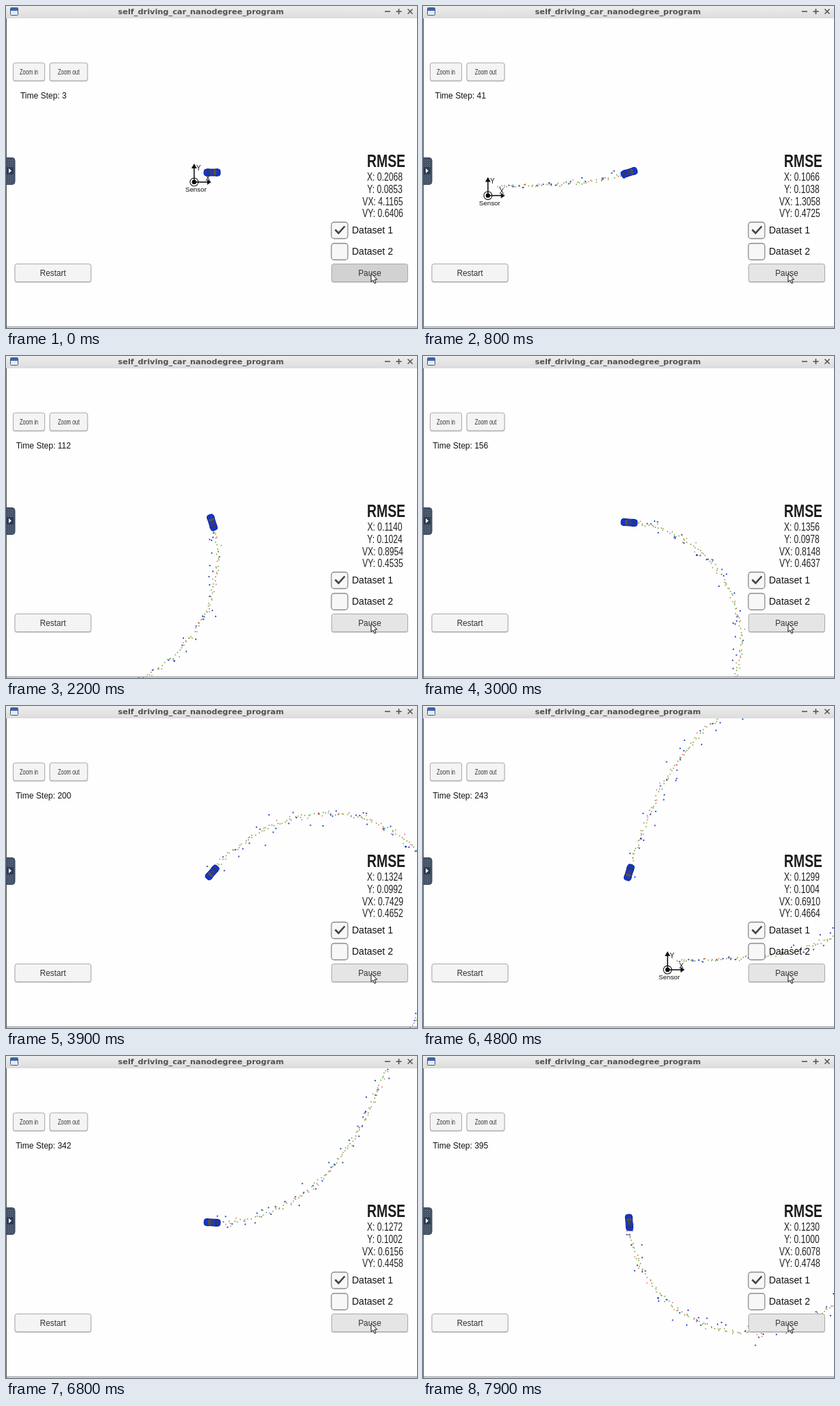
Recreate the animation shown at these times as an HTML page with a canvas. Size 600 px wide and 470 px high, loop 8 s.

```html
<!DOCTYPE html>
<html>
<head>
<meta charset="utf-8">
<style>
html, body { margin: 0; width: 100%; height: 100%; overflow: hidden; background: #fefefe }
canvas { display: block }
</style>
</head>
<body>
<canvas id="stage" width="600" height="470"></canvas>
<script>
const ctx = document.getElementById('stage').getContext('2d');
const SANS = '"Liberation Sans", Arial, sans-serif';
const CAR = { x: 301, y: 243 };
const LAST = 395, SPEED = 4.78;

// Time, step and the four error values at that moment.
const log = [
  [0, 3, .2068, .0853, 4.1165, .6406],
  [1500, 74, .0918, .1085, 1.0076, .4411],
  [3000, 156, .1356, .0978, .8148, .4637],
  [4800, 243, .1299, .1004, .6910, .4664],
  [5900, 295, .1245, .0972, .6418, .4369],
  [6800, 342, .1272, .1002, .6156, .4458],
  [7900, LAST, .1230, .1000, .6078, .4748]
];

// The car swings left through a figure eight with a period of 500 steps.
const heading = s => 2.213 * (1 - Math.cos((s + .6) * Math.PI / 250));

// Positions relative to the sensor, one per time step.
const path = [[12, -14]];
for (let s = 1; s <= LAST; s++) {
  const [x, y] = path[s - 1], angle = heading(s - .5);
  path.push([x + SPEED * Math.cos(angle), y - SPEED * Math.sin(angle)]);
}

function random(n) {
  const v = Math.sin(n * 127.1 + 3.7) * 43758.5453;
  return v - Math.floor(v);
}
const noise = n => 2 * (random(n) + random(n + .31) + random(n + .67) - 1.5);

// Lidar (red) and radar (blue) readings alternate; estimates are green.
const marks = path.map(([x, y], s) => {
  const list = [[x + noise(s + 1000) * 1.4, y + noise(s + 2000) * 1.4, '#62a52c', 1.7]];
  if (s % 2) list.push([x + noise(s + 3000) * 2.7, y + noise(s + 4000) * 2.7, '#e8584a', 1.6]);
  else {
    const r = Math.hypot(x, y) + noise(s + 5000) * 6;
    const angle = Math.atan2(y, x) + noise(s + 6000) * .03;
    list.push([r * Math.cos(angle), r * Math.sin(angle), '#1830c0', 2]);
  }
  return list;
});

function text(str, x, y, size, { color = '#111', align = 'center', squeeze = 1, weight = '', font = SANS } = {}) {
  ctx.save();
  ctx.translate(x, y);
  ctx.scale(squeeze, 1);
  ctx.font = `${weight} ${size}px ${font}`;
  ctx.textAlign = align;
  ctx.fillStyle = color;
  ctx.fillText(str, 0, 0);
  ctx.restore();
}

function rect(x, y, w, h, color) {
  ctx.fillStyle = color;
  ctx.fillRect(x, y, w, h);
}

function box(x, y, w, h, r, fill, stroke, width = 1) {
  ctx.beginPath();
  ctx.roundRect(x, y, w, h, r);
  ctx.fillStyle = fill;
  ctx.fill();
  if (!stroke) return;
  ctx.strokeStyle = stroke;
  ctx.lineWidth = width;
  ctx.stroke();
}

function line(points, color, width) {
  ctx.beginPath();
  points.forEach(p => ctx.lineTo(...p));
  ctx.strokeStyle = color;
  ctx.lineWidth = width;
  ctx.stroke();
}

function shape(points, color) {
  ctx.beginPath();
  points.forEach(p => ctx.lineTo(...p));
  ctx.closePath();
  ctx.fillStyle = color;
  ctx.fill();
}

function disc(r, color) {
  ctx.beginPath();
  ctx.arc(0, 0, r, 0, 7);
  ctx.fillStyle = color;
  ctx.fill();
}

function drawSensor(x, y) {
  ctx.save();
  ctx.translate(x, y);
  disc(6.5, '#111');
  disc(5.4, '#fff');
  disc(3.2, '#000');
  line([[0, 0], [0, -22]], '#111', 1.6);
  line([[0, 0], [21, 0]], '#111', 1.6);
  shape([[-4, -20], [0, -27], [4, -20]], '#111');
  shape([[19, -4], [25, 0], [19, 4]], '#111');
  text('Y', 6.5, -17.5, 10);
  text('X', 20, -2.5, 10);
  text('Sensor', 2.5, 14, 9.8);
  ctx.restore();
}

function drawCar(angle) {
  ctx.save();
  ctx.translate(CAR.x, CAR.y);
  ctx.rotate(-angle);
  for (const x of [-8, 5]) rect(x, -5.5, 4, 11, '#101a50');
  box(-12, -5, 24, 10, 3.5, '#1234d4', '#0c1e88', .8);
  box(-8, -3.5, 3, 7, 1, '#34385a');
  box(2, -4, 4, 8, 1.5, '#57503c');
  box(-3, -3, 4, 6, 1, '#3a4068');
  ctx.restore();
}

function button(label, x, y, w, h, fill, size, squeeze) {
  box(x, y + 1, w, h, 3, '#d0d0d0');
  box(x + .5, y + .5, w - 1, h - 1, 3, fill, '#a9a9a9');
  text(label, x + w / 2, y + h / 2 + size * .35, size, { color: '#333', squeeze });
}

function drawWindow() {
  const bar = ctx.createLinearGradient(0, 0, 0, 18);
  bar.addColorStop(0, '#ededed');
  bar.addColorStop(1, '#dcdcdc');
  rect(0, 0, 600, 18, bar);
  text('self_driving_car_nanodegree_program', 284.5, 12, 11.33,
    { color: '#505050', weight: 'bold', font: '"DejaVu Sans", sans-serif' });
  box(6.5, 2.5, 11, 11, 1, '#e4ebf4', '#46587a');
  rect(7, 3, 10, 4, '#3a66ac');
  line([[553, 8], [561, 8]], '#555', 1.6);
  line([[569.5, 8], [577.5, 8]], '#555', 1.6);
  line([[573.5, 4], [573.5, 12]], '#555', 1.6);
  line([[586.5, 4.5], [593.5, 11.5]], '#555', 1.6);
  line([[593.5, 4.5], [586.5, 11.5]], '#555', 1.6);
  rect(0, 18, 1, 452, '#555');
  rect(0, 468, 600, 1, '#777');

  box(-4, 221.5, 17, 39, 4, '#46546a', '#38445a');
  for (let y = 225; y < 259; y += 3)
    for (let x = 3; x < 11; x += 3) rect(x, y, 1, 1, '#6c7a90');
  box(1, 235, 10, 11, 1, '#2e3a50');
  shape([[4, 237], [8, 240.5], [4, 244]], '#fff');
}

function drawPanel(values, step, pressed) {
  button('Zoom in', 10, 82.5, 47, 27, '#f4f4f4', 11.5, .65);
  button('Zoom out', 63.5, 82.5, 56, 27, '#f4f4f4', 11.5, .65);
  button('Restart', 12.5, 376, 112, 27, '#f4f4f4', 13, .91);
  button('Pause', 475, 376, 112, 27, pressed ? '#d2d2d2' : '#e5e5e5', 13, .91);
  text('Time Step: ' + step, 54.7, 135, 12);

  text('RMSE', 555, 235, 25.5, { color: '#1c1c1c', weight: 'bold', squeeze: .76 });
  ['X', 'Y', 'VX', 'VY'].forEach((name, i) =>
    text(`${name}: ${values[i].toFixed(4)}`, i < 2 ? 553 : 550, 255 + i * 17.8, 16,
      { color: '#222', squeeze: .76 }));

  [315.5, 346.5].forEach((y, i) => {
    box(475, y, 24, 24, 4, '#f7f7f7', '#8a8a8a', 1.3);
    text('Dataset ' + (i + 1), 505, y + 16.5, 14, { align: 'left' });
  });
  line([[480.5, 326.5], [485.5, 331.5], [494.5, 321.5]], '#444', 2.6);
}

function drawCursor() {
  ctx.save();
  ctx.translate(533, 390.5);
  const arrow = [[0, 0], [0, 12], [2.8, 9.5], [5, 14.5], [7, 13.5], [5, 8.8], [8.8, 8.6]];
  shape(arrow, '#fff');
  line([...arrow, arrow[0]], '#111', 1);
  ctx.restore();
}

function draw(time) {
  let i = 0;
  while (i < log.length - 2 && time >= log[i + 1][0]) i++;
  const a = log[i], b = log[i + 1];
  const step = Math.round(a[1] + (b[1] - a[1]) * (time - a[0]) / (b[0] - a[0]));
  const u = Math.log(step / a[1]) / Math.log(b[1] / a[1]);
  const values = [2, 3, 4, 5].map(k => a[k] * (b[k] / a[k]) ** u);
  const ox = CAR.x - path[step][0], oy = CAR.y - path[step][1];

  rect(0, 0, 600, 470, '#fefefe');
  ctx.globalAlpha = .85;
  for (const [x, y, color, size] of marks.slice(1, step + 1).flat())
    rect(ox + x - size / 2, oy + y - size / 2, size, size, color);
  ctx.globalAlpha = 1;
  drawSensor(ox, oy);
  drawCar(heading(step));
  drawWindow();
  drawPanel(values, step, time < 100);
  drawCursor();
}

function tick() {
  draw(Math.floor(performance.now() % 8000 / 100) * 100);
  requestAnimationFrame(tick);
}
tick();
</script>
</body>
</html>
```
